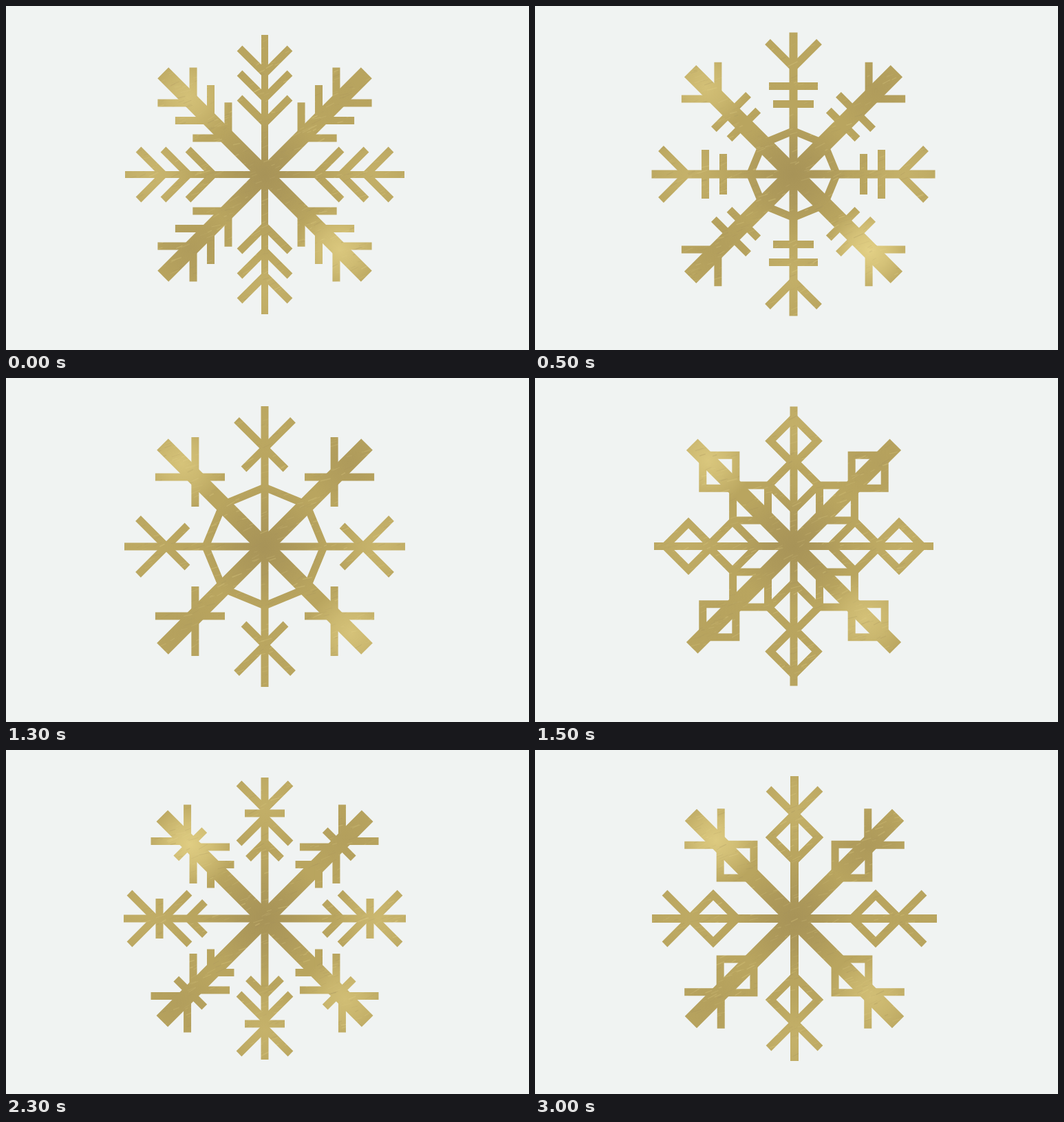
These frames come from a looping animation (760x500 px, 3.5 s). An HTML page with a canvas:

```html
<!DOCTYPE html>
<html lang="en">
<head>
<meta charset="utf-8">
<title>Gold snowflakes</title>
<style>
  html, body { margin: 0; width: 100%; height: 100%; overflow: hidden; background: #f0f3f2; }
  canvas { display: block; }
</style>
</head>
<body>
<canvas id="stage" width="760" height="500"></canvas>
<script>
const W = 760, H = 500, HOLD = 500, ARMS = 8, TURN = 2 * Math.PI / ARMS;
const BACKGROUND = '#f0f3f2', GOLD = '#b9a55f';
const LIGHT = '234,216,140', DARK = '163,143,86';

// Arm parts as [sideways offset, distance from the centre]; all branches run at 45 degrees.
// A positive reach opens a vee outward, a negative one inward.
const vee = (apex, reach) => {
  const side = Math.abs(reach);
  return [[-side, apex + reach], [0, apex], [side, apex + reach]];
};
const bar = (r, half) => [[-half, r], [half, r]];
const diamond = (r, half) =>
  [[0, r + half], [half, r], [0, r - half], [-half, r], [0, r + half], [half, r]];
const ringSide = r => [[0, r], [r * Math.sin(TURN), r * Math.cos(TURN)]];

const pine = { x: 376, y: 245, length: 203, stem: 10, arm: [75, 111, 147].map(r => vee(r, 36.5)) };
const wheel = {
  x: 375.5, y: 244.5, length: 206, stem: 12,
  arm: [vee(155, 37.5), bar(128, 35.5), bar(102, 29.5), ringSide(63)]
};
const web = { x: 376, y: 245, length: 204, stem: 11, arm: [vee(143, 41), vee(143, -30.5), ringSide(86)] };
const lattice = { x: 376, y: 244.5, length: 203, stem: 11, arm: [diamond(153, 34), diamond(89, 36)] };
const frost = {
  x: 376, y: 245, length: 205, stem: 11,
  arm: [vee(159, 37.5), bar(153, 29), vee(147, -37.5), vee(111, -24)]
};
const arrow = { x: 375.5, y: 246.3, length: 204, stem: 11, arm: [vee(184, -30), vee(154, -37.5), vee(66, 24)] };
const kite = { x: 377, y: 245, length: 207, stem: 12, arm: [vee(151, 37.5), diamond(118, 34.5)] };

function seeded(seed) {
  return () => {
    seed = (seed + 0x6D2B79F5) | 0;
    let t = Math.imul(seed ^ (seed >>> 15), 1 | seed);
    t = (t + Math.imul(t ^ (t >>> 7), 61 | t)) ^ t;
    return ((t ^ (t >>> 14)) >>> 0) / 4294967296;
  };
}

function strokePath(g, points, width) {
  g.lineWidth = width;
  g.beginPath();
  points.forEach(([x, y]) => g.lineTo(x, y));
  g.stroke();
}

function drawShape(g, { x, y, length, stem, arm }) {
  g.strokeStyle = GOLD;
  for (let i = 0; i < ARMS; i++) {
    const slanted = i % 2 === 1;
    g.save();
    g.translate(x, y);
    g.rotate(i * TURN);
    g.scale(1, -1);
    strokePath(g, [[0, 0], [0, slanted ? length + 6 : length]], slanted ? stem + 12.5 : stem);
    arm.forEach(part => strokePath(g, part, 11));
    g.restore();
  }
}

// A positive level brightens the foil, a negative one darkens it.
function glow(g, x, y, radius, level) {
  const rgb = level > 0 ? LIGHT : DARK, alpha = Math.min(Math.abs(level), 0.9);
  const fade = g.createRadialGradient(x, y, 0, x, y, radius);
  fade.addColorStop(0, `rgba(${rgb},${alpha})`);
  fade.addColorStop(0.45, `rgba(${rgb},${alpha * 0.65})`);
  fade.addColorStop(1, `rgba(${rgb},0)`);
  g.fillStyle = fade;
  g.fillRect(x - radius, y - radius, radius * 2, radius * 2);
}

function drawFoil(g, { x, y, length }, random) {
  g.globalCompositeOperation = 'source-atop';
  glow(g, x, y, 90, -0.8);
  // Light falls along the falling diagonal and leaves the rising one in shade.
  for (let i = 0; i < ARMS; i++) {
    const facing = Math.cos(2 * (i - 3) * TURN);
    const level = 0.2 + 0.5 * facing + 0.5 * (random() - 0.5);
    const r = length * (0.72 + 0.16 * random());
    glow(g, x + r * Math.sin(i * TURN), y - r * Math.cos(i * TURN), 65, level);
  }
  for (let i = 0; i < 1400; i++) {
    const sx = x + (random() * 2 - 1) * 215, sy = y + (random() * 2 - 1) * 215;
    const size = 4 + random() * 12, angle = -0.55 + random() * 0.35;
    g.strokeStyle = `rgba(${random() < 0.5 ? LIGHT : DARK},${0.08 + random() * 0.2})`;
    strokePath(g, [[sx, sy], [sx + size * Math.cos(angle), sy + size * Math.sin(angle)]], 0.6 + random());
  }
}

function render(flake, index) {
  const layer = document.createElement('canvas');
  layer.width = W;
  layer.height = H;
  const g = layer.getContext('2d');
  drawShape(g, flake);
  drawFoil(g, flake, seeded(index + 7));
  return layer;
}

const layers = [pine, wheel, web, lattice, frost, arrow, kite].map(render);
const stage = document.getElementById('stage').getContext('2d');
const start = performance.now();

function draw() {
  const elapsed = performance.now() - start;
  stage.fillStyle = BACKGROUND;
  stage.fillRect(0, 0, W, H);
  stage.drawImage(layers[Math.floor(elapsed / HOLD) % layers.length], 0, 0);
  requestAnimationFrame(draw);
}
draw();
</script>
</body>
</html>
```
